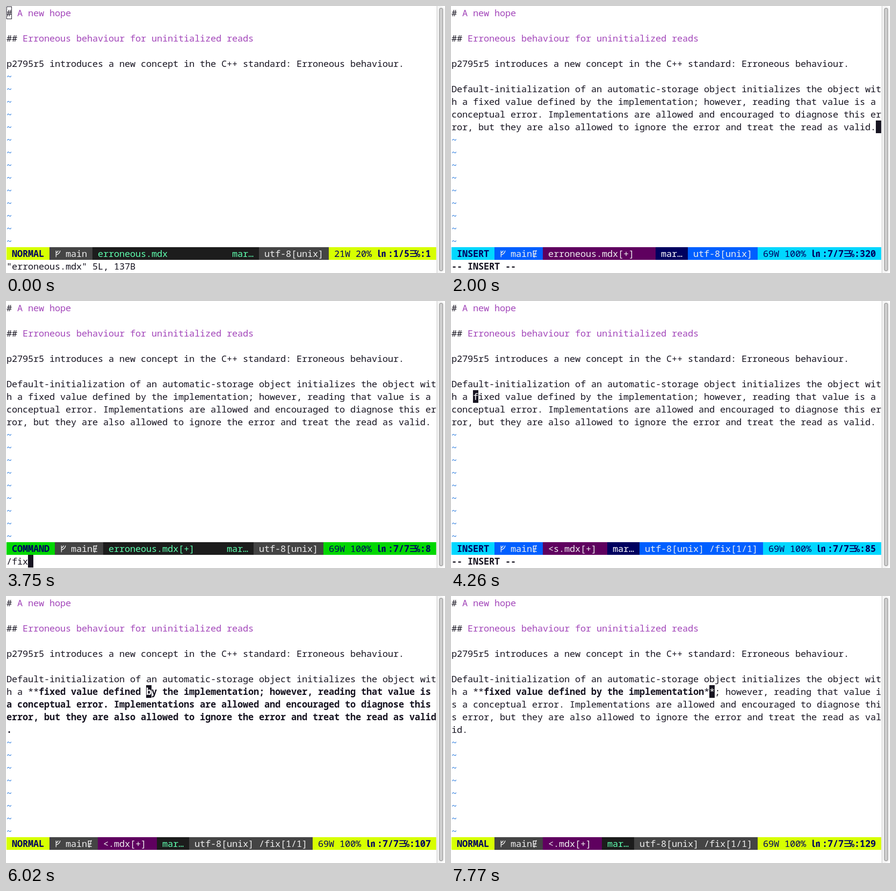
An HTML page with a canvas for the animation above (8000 ms loop, 899x548 px).

```html
<!DOCTYPE html>
<html lang="en">
<head>
<meta charset="utf-8">
<title>Editing erroneous.mdx</title>
<style>
html, body { margin: 0; width: 100%; height: 100%; overflow: hidden; background: #fff; }
canvas { display: block; }
</style>
</head>
<body>
<canvas width="899" height="548"></canvas>
<script>
const ctx = document.querySelector('canvas').getContext('2d');
const CELL = 11, ROW = 26, COLS = 80, STATUS_ROW = 19;
const FONT = '18.667px "Noto Sans Mono", "DejaVu Sans", "Noto Sans CJK JP", "Noto Sans CJK SC", monospace';
const INK = '#171421', PURPLE = '#a347ba', TILDE = '#2a7bde', NAVY = '#00005f';

const INTRO = [
  '# A new hope', '',
  '## Erroneous behaviour for uninitialized reads', '',
  'p2795r5 introduces a new concept in the C++ standard: Erroneous behaviour.'
];
const PARAGRAPH = 'Default-initialization of an automatic-storage object initializes the object with ' +
  'a fixed value defined by the implementation; however, reading that value is a conceptual error. ' +
  'Implementations are allowed and encouraged to diagnose this error, but they are also allowed ' +
  'to ignore the error and treat the read as valid.';
const OPEN_AT = PARAGRAPH.indexOf('fixed'), CLOSE_AT = PARAGRAPH.indexOf(';');

// Each section is [text, background]
const dark = { b: ['#eeeeee', '#444444'], c: ['#5fffaf', '#1c1c1c'] };
const THEMES = {
  NORMAL: { a: '#d7ff00', ...dark },
  COMMAND: { a: '#00d700', ...dark },
  INSERT: { a: '#00d7ff', b: ['#eeeeee', '#005fff'], c: ['#ffffff', NAVY] }
};
const MODIFIED = ['#eeeeee', '#5f005f'];

const INSERT = { mode: 'INSERT', msg: '-- INSERT --' };
const NORMAL = { mode: 'NORMAL', msg: '' };
const at = col => ({ col });

// One entry per 250 ms; each changes the editor state before it
const STEPS = [
  { ...NORMAL, msg: '"erroneous.mdx" 5L, 137B', hollow: true, line: 1, col: 1, lines: 5,
    pasted: false, open: 0, close: 0, dirty: '', search: '' },
  { hollow: false },
  { line: 3 },
  { line: 5 },
  { ...INSERT, col: 75 },
  { dirty: 'Ɇ' },
  { line: 6, lines: 6, col: 1 },
  { line: 7, lines: 7 },
  { pasted: true, col: 320 },
  { msg: '' },
  { ...NORMAL, col: 319 },
  at(1),
  at(8),
  { mode: 'COMMAND', msg: '/' },
  { msg: '/fi' },
  { msg: '/fix' },
  { mode: 'NORMAL', search: '/fix[1/1] ', col: 85 },
  INSERT,
  { open: 1, col: 86 },
  { open: 2, col: 87 },
  { msg: '' },
  { ...NORMAL, col: 86 },
  at(93), at(99), at(107), at(114), at(128),
  INSERT,
  { close: 1, col: 129 },
  { close: 2, col: 130 },
  { msg: '' },
  { ...NORMAL, col: 129 }
];
const states = [];
STEPS.forEach((step, i) => states.push({ ...states[i - 1], ...step }));

const cellX = col => 1 + col * CELL;
const cellY = row => 1 + row * ROW;

function box(col, row, width, color) {
  ctx.fillStyle = color;
  ctx.fillRect(cellX(col), cellY(row), width * CELL, ROW);
}

function put(col, row, text, color, bold) {
  ctx.font = (bold ? 'bold ' : '') + FONT;
  ctx.fillStyle = color;
  [...text].forEach((ch, i) => {
    if (ch !== ' ') ctx.fillText(ch, cellX(col + i), cellY(row) + 20);
  });
}

function branchIcon(col, color) {
  const x = cellX(col), y = cellY(STATUS_ROW);
  ctx.strokeStyle = color;
  ctx.lineWidth = 1.4;
  ctx.stroke(new Path2D(`M${x + 2.5} ${y + 7}v13.5m0-4.5q7-2 8.5-9m-8.5 5q3.5-1.5 4.5-5`));
}

function drawText(s) {
  const paragraph = PARAGRAPH.slice(0, OPEN_AT) + '*'.repeat(s.open) +
    PARAGRAPH.slice(OPEN_AT, CLOSE_AT) + '*'.repeat(s.close) + PARAGRAPH.slice(CLOSE_AT);
  const lines = [...INTRO, '', s.pasted ? paragraph : ''].slice(0, s.lines);
  const boldFrom = s.open === 2 ? OPEN_AT + 2 : Infinity;
  const boldTo = s.close === 2 ? CLOSE_AT + 2 : Infinity;
  let row = 0;

  lines.forEach((line, n) => {
    const hashes = line.match(/^#*/)[0].length;
    const cursor = n + 1 === s.line && s.mode !== 'COMMAND' ? s.col - 1 : -1;
    for (let i = 0; i < Math.max(line.length, cursor + 1); i++) {
      const col = i % COLS, y = row + Math.floor(i / COLS);
      const solid = i === cursor && !s.hollow;
      if (solid) box(col, y, 1, INK);
      if (i === cursor && s.hollow) {
        ctx.strokeStyle = INK;
        ctx.lineWidth = 1;
        ctx.strokeRect(cellX(col) + .5, cellY(y) + .5, CELL - 1, ROW - 1);
      }
      const color = solid ? '#fff' : hashes && i >= hashes ? PURPLE : INK;
      put(col, y, line[i] || ' ', color, n === 6 && i >= boldFrom && i < boldTo);
    }
    row += Math.max(1, Math.ceil(line.length / COLS));
  });
  for (; row < STATUS_ROW; row++) put(0, row, '~', TILDE);
  return lines.join(' ').match(/\S+/g).length;
}

function drawStatus(s, words) {
  const { a, b, c } = THEMES[s.mode];
  const changed = s.lines > 5;
  const mode = ` ${s.mode} `, branch = `   main${s.dirty} `, type = ' mar… ';
  const encoding = ` utf-8[unix] ${s.search}`;
  const progress = ` ${words}W ${Math.round(100 * s.line / s.lines)}% `;
  const position = `㏑ :${s.line}/${s.lines}☰℅:${s.col} `;
  const room = COLS - (mode + branch + type + encoding + progress + position).length;
  let name = 'erroneous.mdx' + (changed ? '[+]' : '');
  if (name.length > room - 2) name = '<' + name.slice(4 - room);
  const nameColors = changed && s.mode !== 'COMMAND' ? MODIFIED : c;

  const sections = [
    [mode, NAVY, a, true],
    [branch, ...b],
    [(' ' + name).padEnd(room), ...nameColors],
    [type, ...c],
    [encoding, ...b],
    [progress, NAVY, a],
    [position, NAVY, a, true]
  ];
  let col = 0;
  for (const [text, color, back, bold] of sections) {
    box(col, STATUS_ROW, text.length, back);
    put(col, STATUS_ROW, text, color, bold);
    col += text.length;
  }
  branchIcon(mode.length + 1, b[0]);
}

function drawMessage(s) {
  put(0, STATUS_ROW + 1, s.msg, INK, s.msg.startsWith('--'));
  if (s.mode === 'COMMAND') box(s.msg.length, STATUS_ROW + 1, 1, INK);
}

function roundBox(x, y, w, h, radii, color) {
  ctx.fillStyle = color;
  ctx.beginPath();
  ctx.roundRect(x, y, w, h, radii);
  ctx.fill();
}

function drawScrollbar() {
  roundBox(882, 0, 17, 548, [0, 10, 10, 0], '#f5f5f5');
  ctx.fillStyle = '#c4c4c4';
  ctx.fillRect(882, 0, 1, 548);
  roundBox(887, 4, 8, 540, 4, '#8b8b8b');
  roundBox(888, 5, 6, 538, 3, '#cecece');
}

function draw(now) {
  const t = now % 8000;
  const step = Math.floor((t >= 4520 ? t - 20 : t) / 250);
  const s = states[Math.min(step, states.length - 1)];
  ctx.fillStyle = '#fff';
  ctx.fillRect(0, 0, 899, 548);
  drawStatus(s, drawText(s));
  drawMessage(s);
  drawScrollbar();
}

const start = performance.now();
function tick() {
  draw(performance.now() - start);
  requestAnimationFrame(tick);
}
tick();
</script>
</body>
</html>
```
